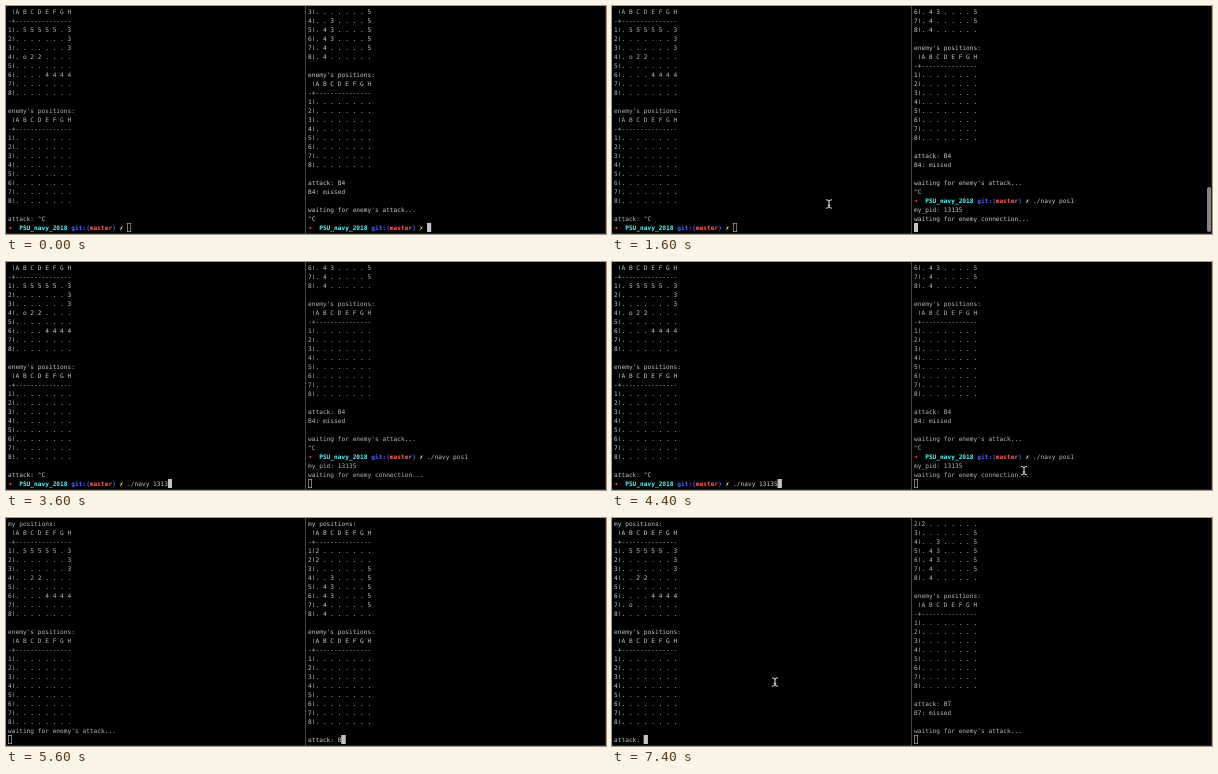
Write an HTML page that moves like this. It is 600 by 228 pixels and loops after 8 s.

```html
<!DOCTYPE html>
<html lang="en">
<head>
<meta charset="utf-8">
<title>Two terminals</title>
<style>
  html, body { margin: 0; width: 100%; height: 100%; overflow: hidden; background: #000; }
  #stage { position: relative; width: 600px; height: 228px; overflow: hidden; background: #000; }
  /* Panes are laid out ten times larger so the tiny text keeps exact advances. */
  pre {
    position: absolute; top: 1.4px; margin: 0;
    font: 61.8px/90px "DejaVu Sans Mono", "Liberation Mono", monospace;
    text-rendering: geometricPrecision; color: #b8b8b8;
    transform: scale(.1); transform-origin: 0 0;
  }
  pre.active { color: #c8c8c8; }
  #left { left: 1.5px; }
  #right { left: 302.3px; }
  pre b { color: #4f62ff; }
  pre .red { color: #ff5f57; }
  pre .cyan { color: #5ff5f5; }
  pre .yellow { color: #f3ee5c; }
  .glyph { display: inline-block; width: 37.2px; }
  .pipe { display: inline-block; font-style: normal; transform: scaleY(.74); }
  .cursor {
    display: inline-block; box-sizing: border-box; vertical-align: top;
    width: 40px; height: 90px; border: 7px solid #aaa;
  }
  .active .cursor { background: #c4c4c4; border-color: #c4c4c4; }
  #divider { position: absolute; left: 299px; top: 0; width: 1px; height: 228px; background: #444; }
  #edge { position: absolute; inset: 0; border: solid #1a2a30; border-width: 0 1px 1px 0; }
  .bar { position: absolute; top: 181px; width: 4px; height: 45px; border-radius: 2px; background: #858585; }
  #barL { left: 294px; }
  #barR { left: 595px; }
  #mouse { position: absolute; left: -4px; top: -5px; }
</style>
</head>
<body>
<div id="stage">
  <pre id="left"></pre>
  <pre id="right"></pre>
  <div id="edge"></div>
  <div id="divider"></div>
  <div class="bar" id="barL"></div>
  <div class="bar" id="barR"></div>
  <svg id="mouse" width="8" height="10" fill="none" stroke="#ddd">
    <path d="M1 .8Q4 .8 4 2.5Q4 .8 7 .8M4 2V8M1 9.2Q4 9.2 4 7.5Q4 9.2 7 9.2M2.7 6.3H5.3"/>
  </svg>
</div>
<script>
const LOOP = 8000, STEP = 100, ROWS = 25;
const $ = id => document.getElementById(id);

const pipe = '<i class="pipe">|</i>';
const grid = rows => ` ${pipe}A B C D E F G H\n-+---------------\n` +
  rows.map((r, i) => `${i + 1}${pipe}${[...r].join(' ')}`).join('\n');
const empty = grid(Array(8).fill('........'));
const boards = rows => `my positions:\n${grid(rows)}\n\nenemy's positions:\n${empty}\n`;

const fleetL = ['.55555.3', '.......3', '.......3', '..22....',
                '........', '....4444', '........', '........'];
const fleetR = ['2.......', '2.......', '.......5', '..3....5',
                '.43....5', '.43....5', '.4.....5', '.4......'];
const hit = (rows, n, row) => rows.map((r, i) => i === n - 1 ? row : r);

const prompt = '<b class="red glyph">➜</b>  <b class="cyan">PSU_navy_2018</b> ' +
  '<b>git:(</b><b class="red">master</b><b>)</b> <b class="yellow glyph">✗</b> ';
const waiting = "waiting for enemy's attack...\n";
const shot = cell => `\nattack: ${cell}\n${cell}: missed\n\n${waiting}`;

// Part of the text entered by time t, given one key time per character.
const typed = (t, text, keys) => text.slice(0, keys.filter(k => k <= t).length);
const keysR = [100, 200, 300, 400, 500, 600, 700, 800, 1000, 1100, 1200];
const keysL = [1900, 2000, 2000, 2100, 2100, 2200, 2200, 2800, 3200, 3300, 3600, 3900];

const oldL = boards(hit(fleetL, 4, '.o22....')) + '\nattack: ^C\n' + prompt;
const oldR = boards(fleetR) + shot('B4') + '^C\n' + prompt;

function leftText(t) {
  if (t < 4700) return oldL + typed(t, './navy 13135', keysL);
  if (t < 6900) return boards(fleetL) + waiting;
  return boards(hit(fleetL, 7, '.o......')) + '\nattack: ';
}

function rightText(t) {
  if (t < 1400) return oldR + typed(t, './navy pos1', keysR);
  if (t < 4700) return oldR + './navy pos1\nmy_pid: 13135\nwaiting for enemy connection...\n';
  if (t < 6900) return boards(fleetR) + '\nattack: ' + typed(t, 'B7', [5600, 6600]);
  return boards(fleetR) + shot('B7');
}

const leftActive = t => (t >= 1700 && t < 5200) || t >= 7300;

// Pointer trips: [time, x, y] points, shown until the next key press hides it.
const trips = [
  { end: 1900, path: [[1500, 374, 194], [1700, 60, 202], [1800, 20, 204]] },
  { end: 4700, path: [[4000, 20, 204], [4200, 220, 206], [4500, 508, 210]] },
  { end: 5600, path: [[4900, 530, 208], [5100, 430, 200], [5300, 374, 194]] },
  { end: 8000, path: [[7000, 374, 194], [7200, 240, 174], [7400, 163, 164]] }
];
// The pointer has left the stage by the time the second trip ends.

function pointer(t) {
  const trip = trips.find(p => t >= p.path[0][0] && t < p.end);
  if (!trip) return null;
  const i = trip.path.findIndex(p => p[0] > t);
  if (i < 0) return trip.path[trip.path.length - 1].slice(1);
  const [t0, x0, y0] = trip.path[i - 1], [t1, x1, y1] = trip.path[i];
  const k = (t - t0) / (t1 - t0);
  return [x0 + (x1 - x0) * k, y0 + (y1 - y0) * k];
}

// Scroll bar shows at once, holds, then fades away.
const fade = (t, on, hold, off) =>
  t < on ? 0 : Math.max(0, Math.min(1, (off - t) / (off - hold)));

function show(id, text, active) {
  const pane = $(id);
  pane.innerHTML = text.split('\n').slice(-ROWS).join('\n') + '<i class="cursor"></i>';
  pane.className = active ? 'active' : '';
}

let last = -1;
function draw() {
  const t = Math.floor(performance.now() % LOOP / STEP) * STEP;
  if (t !== last) {
    last = t;
    const onLeft = leftActive(t), at = pointer(t), mouse = $('mouse');
    show('left', leftText(t), onLeft);
    show('right', rightText(t), !onLeft);
    $('barL').style.opacity = fade(t, 4700, 4900, 5200);
    $('barR').style.opacity = fade(t, 1400, 1600, 1900);
    mouse.style.display = at ? 'block' : 'none';
    if (at) mouse.style.transform = `translate(${at[0]}px, ${at[1]}px)`;
  }
  requestAnimationFrame(draw);
}
draw();
</script>
</body>
</html>
```
